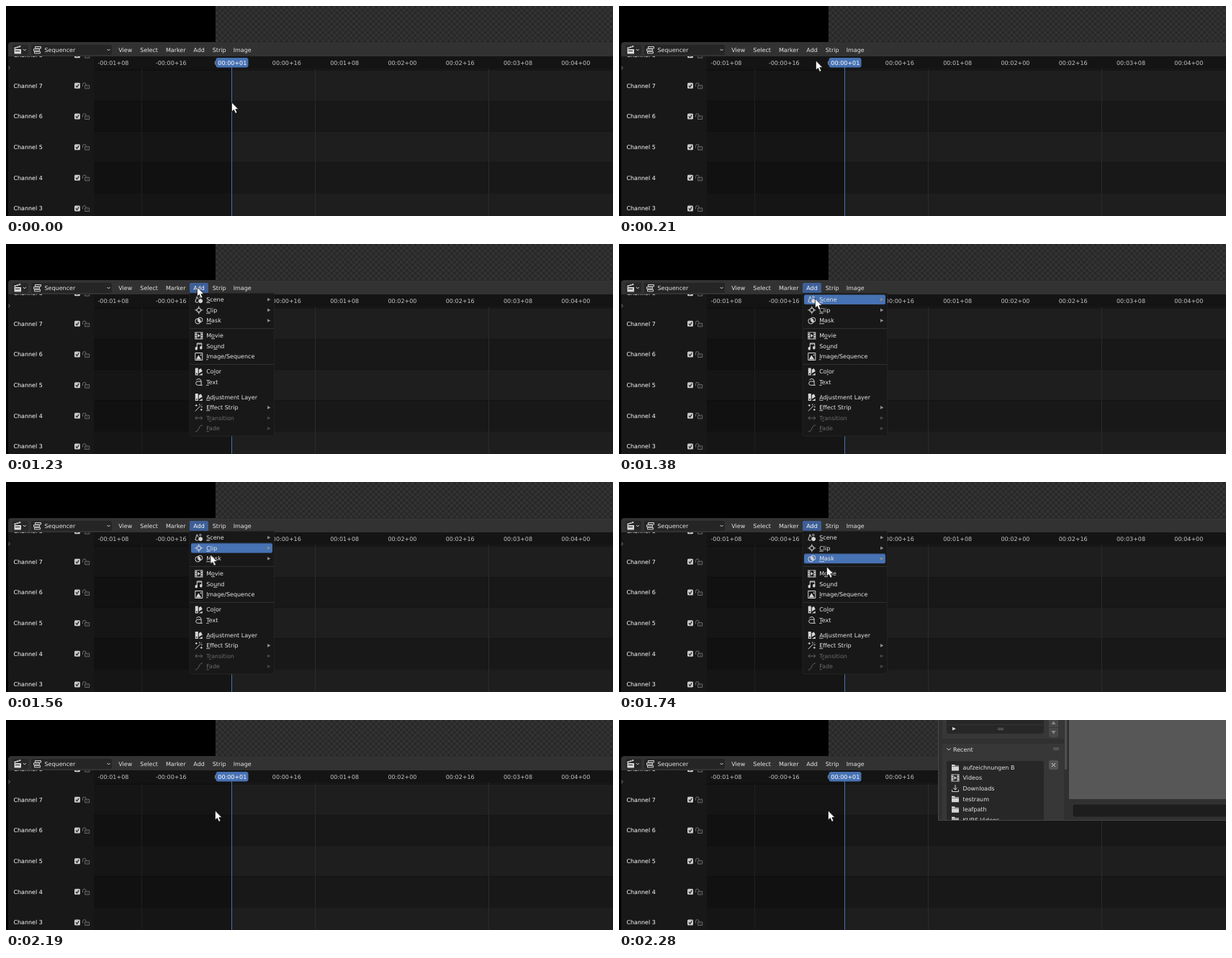
Write an HTML page that moves like this. It is 843 by 292 pixels and loops after 2.49 s.

```html
<!DOCTYPE html>
<html lang="en">
<head>
<meta charset="utf-8">
<title>Sequencer add menu</title>
<style>
  html, body { margin: 0; width: 100%; height: 100%; overflow: hidden; background: #000; }
  svg { display: block; width: 843px; height: 292px; }
  text {
    font: 8px "DejaVu Sans", sans-serif; fill: #e6e6e6; white-space: pre;
    text-rendering: geometricPrecision;
  }
  .mid { text-anchor: middle; }
  .ruler text { fill: #c4c4c4; }
  .bright { fill: #fff; }
  .line { fill: none; stroke: #d6d6d6; stroke-width: 1; }
  .solid { fill: #d6d6d6; }
  .key { text-decoration: underline #b0b0b0; text-underline-offset: 1px; }
  .off { opacity: .4; }

  #cursor, #menu, #row, #browser { animation: 2490ms infinite step-end; }
  #menu, #row, #browser { visibility: hidden; }
  #cursor { animation-name: point; }
  #menu { animation-name: menu; }
  #row { animation-name: row; }
  #browser { animation-name: browser; }

  @keyframes point {
    0% { transform: translate(313px, 134px); animation-timing-function: steps(7); }
    8.434% { transform: translate(273px, 76px); animation-timing-function: steps(3); }
    12.048% { transform: translate(267px, 64px); animation-timing-function: steps(4); }
    16.867% { transform: translate(265px, 60px); }
    49.398% { transform: translate(265px, 60px); animation-timing-function: steps(5); }
    55.422% { transform: translate(272px, 76px); animation-timing-function: steps(6); }
    62.651% { transform: translate(283.5px, 101px); animation-timing-function: steps(6); }
    69.88% { transform: translate(288px, 118px); animation-timing-function: steps(7); }
    78.313%, 100% { transform: translate(290px, 126px); }
  }
  @keyframes menu {
    0% { visibility: hidden; }
    19.277% { visibility: visible; }
    86.747%, 100% { visibility: hidden; }
  }
  @keyframes row {
    0% { visibility: hidden; transform: none; }
    54.217% { visibility: visible; transform: none; }
    57.831% { visibility: visible; transform: translateY(14.6px); }
    63.855% { visibility: visible; transform: translateY(29.2px); }
    71.084% { visibility: visible; transform: translateY(50px); }
    86.747%, 100% { visibility: hidden; transform: none; }
  }
  @keyframes browser {
    0% { visibility: hidden; }
    89.157%, 100% { visibility: visible; }
  }
</style>
</head>
<body>
<svg viewBox="0 0 843 292">
  <defs>
    <pattern id="checker" x="291" width="7.76" height="7.76" patternUnits="userSpaceOnUse">
      <path fill="#282828" d="M0 0h7.76v7.76h-7.76z"/>
      <path fill="#333" d="M0 0h3.88v3.88h-3.88zM3.88 3.88h3.88v3.88h-3.88z"/>
    </pattern>
    <clipPath id="panel"><path d="M3 70H843V292H3z"/></clipPath>
    <clipPath id="dialog"><path d="M443 0H843V140H443z"/></clipPath>
    <path id="folder" class="solid" d="M-5-4h4l1 1.5h5v1h-10zM-5-1h10v5.5h-10z"/>
    <g id="film">
      <path class="solid" fill-rule="evenodd" d="M-5.5-5h11v10h-11zM-4.5-4v1.5h1v-1.5zM-4.5-1v1.7h1v-1.7zM-4.5 2.4v1.6h1v-1.6zM3.5-4v1.5h1v-1.5zM3.5-1v1.7h1v-1.7zM3.5 2.4v1.6h1v-1.6zM-2.6-4.2v8.4h5.2v-8.4z"/>
      <path class="solid" d="M-1.5-2.5L2 0L-1.5 2.5z"/>
    </g>
    <path id="lock" fill="none" stroke="#777" stroke-width=".9" d="M-4.5 1v-2.5a2.3 2.3 0 0 1 4.6 0V-.5M-1.3-.5h6v4.5h-6zM1.2 1.7h1.2"/>
    <path id="grip" stroke="#aaa" stroke-dasharray="1 1" d="M-3.5-1h7M-3.5 1h7"/>
  </defs>

  <path fill="url(#checker)" d="M291 0H843V50H291z"/>

  <g id="tracks" clip-path="url(#panel)"></g>

  <g id="ruler" class="ruler"></g>
  <path stroke="#4772b3" d="M313.5 85V292"/>
  <rect x="291.5" y="72" width="45" height="13.5" rx="3" fill="#4772b3"/>
  <text class="mid bright" x="314.3" y="82">00:00+01</text>

  <path fill="#323232" d="M3 70V54q0-3.5 3.5-3.5H843V70z"/>
  <path stroke="#3b3b3b" d="M6 51H843"/>
  <rect x="9" y="54" width="22" height="14" rx="2.5" fill="#272727"/>
  <rect x="35" y="54" width="112" height="14" rx="2.5" fill="#252525"/>
  <path class="solid" d="M11.5 60h9.5v6.5h-9.5zM11 58l9-3 .6 1.8-9 3z"/>
  <path stroke="#272727" d="M13 62.5h6M14 57.5l1 1.3M17 56.3l1 1.3"/>
  <path class="line" d="M23.8 60l2 2 2-2M140.5 60l2 2 2-2"/>
  <path class="line" d="M40.5 56.5h8v2.5h-8zM38.5 59.8h8v2.5h-8zM39.5 63.3h8v2.5h-8z"/>
  <text x="53.5" y="64">Sequencer</text>
  <g id="header"></g>

  <g id="menu">
    <rect x="255" y="54" width="26" height="14.5" rx="2" fill="#3d5f96"/>
    <text class="mid bright" x="268" y="64">Add</text>
    <path fill="#181818" stroke="#272727" stroke-width=".8" d="M255 68.4H372.4V264.5q0 2.5-2.5 2.5H257.5q-2.5 0-2.5-2.5z"/>
    <path stroke="#303030" d="M256 117.5H372M256 167.5H372"/>
    <rect id="row" x="257" y="70.4" width="113" height="13.6" rx="2" fill="#4772b3"/>
    <g id="items"></g>
  </g>

  <g id="browser" clip-path="url(#dialog)">
    <path fill="#303030" d="M443 0H843V140H443z"/>
    <path fill="#373737" d="M449 0H618V26H449zM449 33H618V140H449z"/>
    <path fill="#272727" d="M455 0H590V16q0 3-3 3H458q-3 0-3-3z"/>
    <path fill="#272727" d="M455 140V60q0-3 3-3H587q3 0 3 3V140z"/>
    <path stroke="#343434" d="M456 6.5H589"/>
    <path class="solid" d="M463 9.8l5 2.4-5 2.4z"/>
    <use href="#grip" x="530" y="12.5"/>
    <path fill="#484848" d="M597 0h13v10h-13zM597 11h13v10q0 3-3 3h-7q-3 0-3-3z"/>
    <path fill="#888" d="M600.5 6l3-4.5 3 4.5zM600.5 15l3 4.5 3-4.5z"/>
    <path class="line" d="M455.5 39.3l2.5 2.6 2.5-2.6"/>
    <text x="464" y="43.5">Recent</text>
    <use href="#grip" x="607" y="40"/>
    <rect x="597" y="56" width="13" height="13" rx="2.5" fill="#545454"/>
    <path class="line" d="M601 60l5 5M606 60l-5 5"/>
    <rect x="619" y="-5" width="3" height="74" rx="1.5" fill="#505050"/>
    <path fill="#575757" d="M625 0H843V110H625z"/>
    <rect x="630" y="117" width="220" height="18" rx="3" fill="#1d1d1d" stroke="#3b3b3b" stroke-width=".7"/>
    <g id="places"></g>
    <path stroke="#464646" fill="none" d="M443.5 0V139.5H843"/>
  </g>

  <path id="cursor" fill="#fff" stroke="#111" stroke-width=".7" d="M.5 0V13L3.4 10.3L5.6 15.3L8 14.3L5.8 9.5H9.8z"/>
</svg>
<script>
  const fill = (id, parts) => { document.getElementById(id).innerHTML = parts.join(""); };
  const text = (x, y, label, cls = "") => `<text x="${x}" y="${y}" class="${cls}">${label}</text>`;
  const box = (x, y, w, h, color) => `<rect x="${x}" y="${y}" width="${w}" height="${h}" fill="${color}"/>`;

  const bandHeight = 42.67;
  const tracks = [box(3, 70, 119, 222, "#181818")];
  for (let n = 8; n >= 3; n--) {
    const y = 110.8 + (7 - n) * bandHeight;
    const top = y - bandHeight / 2;
    const odd = n % 2;
    tracks.push(
      box(122, top, 191.5, bandHeight, odd ? "#151515" : "#111"),
      box(313.5, top, 529.5, bandHeight, odd ? "#1e1e1e" : "#181818"),
      text(10.4, Math.round(y + 3), `Channel ${n}`, "bright"),
      `<rect x="95" y="${y - 4}" width="8" height="8" rx="1.5" fill="#c9c9c9"/>`,
      `<path d="M97 ${y}l1.6 2 2.6-4" fill="none" stroke="#222" stroke-width="1.2"/>`,
      `<use href="#lock" x="111" y="${y}"/>`
    );
  }
  tracks.push('<path stroke="#2b2b2b" d="M429.5 87V292M670.5 87V292"/>',
    '<path stroke="#202020" d="M188.5 87V292"/>',
    '<path fill="none" stroke="#888" stroke-width=".9" d="M3 83.5l2.4 2.5-2.4 2.5"/>');
  fill("tracks", tracks);

  const marks = ["-00:01+08", "-00:00+16", "00:00+00", "00:00+16", "00:01+08",
    "00:02+00", "00:02+16", "00:03+08", "00:04+00"];
  fill("ruler", [box(122, 70, 721, 17.5, "#141414"),
    ...marks.map((m, i) => text(148.9 + i * 80.3, 82, m, "mid"))]);

  const titles = { View: 156.2, Select: 186.3, Marker: 221.9, Add: 260.3, Strip: 286.7, Image: 315.7 };
  fill("header", Object.entries(titles).map(([label, x]) => text(x, 64, label)));

  const line = d => `<path class="line" d="${d}"/>`;
  const solid = d => `<path class="solid" d="${d}"/>`;
  const icons = {
    scene: line("M-2.5-4.5L-5 3q2 1.5 4 .8M-2.5-4.5L-.8-.5M2-4.8a1.2 1.2 0 1 0 .1 0") +
      solid("M2.3-1a3 3 0 1 0 .1 0z"),
    clip: line("M-3 0a3 3 0 1 0 6 0a3 3 0 1 0-6 0M-5.5 0h4M1.5 0h4M0-5.5v4M0 1.5v4"),
    mask: line("M-5 .8a3.7 3.7 0 1 0 7.4 0a3.7 3.7 0 1 0-7.4 0M-1.6-1a3.3 3.3 0 1 0 6.6 0a3.3 3.3 0 1 0-6.6 0") +
      solid("M-.6-2.7A3.7 3.7 0 0 1 2 2.2A3.3 3.3 0 0 1-.6-2.7z"),
    film: '<use href="#film"/>',
    sound: line("M-2.5 3V-4H4V2M-2.5-3H4") + solid("M-5 3.3a1.7 1.5 0 1 0 3 0a1.7 1.5 0 1 0-3 0M1.5 2.3a1.7 1.5 0 1 0 3 0a1.7 1.5 0 1 0-3 0"),
    image: line("M-5-5H5V5H-5z") + solid("M-4 4l3.5-6L3.5 4zM2-3h1.7v1.7H2z"),
    swatch: solid("M-5-5h4v10h-4zM0-3l3-1.5 2 4-5 3zM0 5l5-3v3z") +
      '<circle cx="-3" cy="3" r=".9" fill="#181818"/>',
    text: line("M-3.5-2.5q1-2 3.5-2t3.3 3V4.3H-1.5a2.6 2.6 0 0 1 0-5.2H3.3M3.3 4.3h1.7"),
    effect: line("M-5 5L2-2M-3.5-4.5v3M-5-3h3M3.5 1.5v3M2 3h3M1-5v2M4-4l-1 1M5-1h-2"),
    transition: line("M-5 0H5M-2.5-2.5L-5 0l2.5 2.5M2.5-2.5L5 0 2.5 2.5"),
    fade: line("M-5 4.5C1 4.5-1-4.5 5-4.5")
  };

  // label with "_" before its shortcut letter, row centre, icon, has submenu, disabled
  const items = [
    ["_Scene", 77.3, "scene", 1], ["_Clip", 91.9, "clip", 1], ["_Mask", 106.5, "mask", 1],
    ["M_ovie", 127.4, "film"], ["So_und", 142, "sound"], ["_Image/Sequence", 156.5, "image"],
    ["Co_lor", 177.4, "swatch"], ["_Text", 192, "text"],
    ["_Adjustment Layer", 212.9, "swatch"], ["_Effect Strip", 227.4, "effect", 1],
    ["T_ransition", 242, "transition", 1, 1], ["_Fade", 256.5, "fade", 1, 1]
  ];
  fill("items", items.map(([label, y, icon, submenu, off]) =>
    `<g class="${off ? "off" : ""}"><g transform="translate(267.8 ${y})">${icons[icon]}</g>` +
    text(278.2, y + 2.9, label.replace(/_(.)/, '<tspan class="key">$1</tspan>')) +
    (submenu ? `<path fill="#8c8c8c" d="M363 ${y - 2.3}l4.5 2.3-4.5 2.3z"/>` : "") + "</g>"));

  const places = [["aufzeichnungen B"], ["Videos", "film"], ["Downloads", "down"],
    ["testraum"], ["leafpath"], ["KURS Videos"]];
  const download = line("M0-5V2M-2.7-.7L0 2l2.7-2.7M-4.5 2v2.5h9V2");
  fill("places", places.map(([label, icon], i) => {
    const y = 66 + i * 14.55;
    const mark = icon === "down" ? download : `<use href="#${icon || "folder"}"/>`;
    return `<g transform="translate(467 ${y})">${mark}</g>` + text(477.5, y + 2.9, label);
  }));
</script>
</body>
</html>
```
